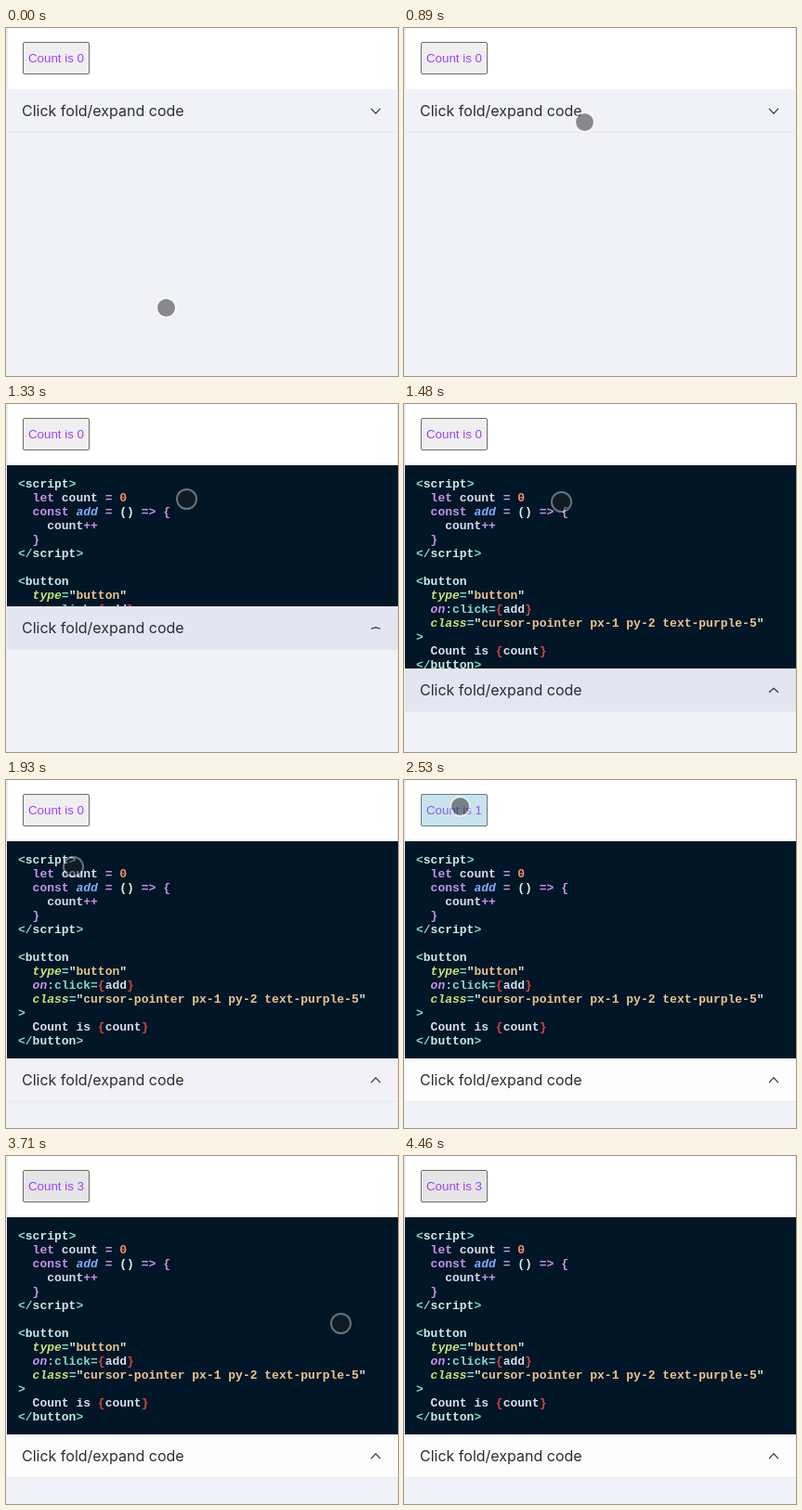
These frames come from a looping animation (422x375 px, 4910 ms). An HTML page:

```html
<!DOCTYPE html>
<html>
<head>
<meta charset="utf-8">
<style>
  html, body { margin: 0; width: 100%; height: 100%; overflow: hidden; background: #f1f2f7; }
  body { position: relative; }
  div, svg { position: absolute; box-sizing: border-box; }
  #top { left: 1px; top: 0; width: 421px; height: 66px; background: #fff; border: solid #e9eaee; border-width: 0 1px; }
  #button {
    left: 18px; top: 15px; width: 72px; height: 35px; border: 1px solid #6b6b6b; border-radius: 2px;
    font: 13.333px/33px "Liberation Sans", Arial, sans-serif; text-align: center; white-space: nowrap; color: #a340f5;
  }
  #tap { left: 18px; top: 15px; width: 72px; height: 35px; border-radius: 2px; background: #33b5e5; }
  #code { left: 1px; top: 66px; width: 421px; overflow: hidden; background: #011627; }
  pre { margin: 13px 12px; font: bold 13px/15px "Liberation Mono", monospace; color: #d6deeb; }
  pre i { color: #c5e478; }
  .t { color: #7fdbca; } .n { color: #caece6; } .k { color: #c792ea; } .f { color: #82aaff; }
  .o { color: #f78c6c; } .s { color: #ecc48d; } .q { color: #d9f5dd; } .b { color: #d3423e; }
  #fold {
    left: 1px; width: 421px; height: 47px; padding-left: 16px; border: 1px solid #e9eaef; border-width: 0 0 1px;
    font: 16px/47px Inter, sans-serif; white-space: nowrap; color: #2c2d32;
  }
  #chevron { left: 391px; top: 18px; width: 12px; height: 11px; }
  #cursor {
    width: 23px; height: 23px; margin: -11.5px; border: 2px solid rgba(255,255,255,.4); border-radius: 50%;
    background: rgba(32,32,32,.5) padding-box;
  }
</style>
</head>
<body>
<div id="top"></div>
<div id="button"></div>
<div id="tap"></div>
<div id="code"><pre></pre></div>
<div id="fold">Click fold/expand code
  <svg id="chevron" viewBox="0 0 12 11"><path id="arrow" fill="none" stroke="#2c2d32" stroke-width="1.2"/></svg>
</div>
<div id="cursor"></div>
<script>
const $ = id => document.getElementById(id);
const LOOP = 4910, TICK = 148.6, CODE_HEIGHT = 234;

// Markup: [class:text] colours a run of code; f and i runs may be italic.
const source = `[t:<][n:script][t:>]
  [k:let] count [k:=] [o:0]
  [k:const] [f i:add] [k:=] [q:()] [k:=>] [k:{]
    count[k:++]
  [k:}]
[t:</][n:script][t:>]

[t:<][n:button]
  [i:type][t:=][q:"][s:button][q:"]
  [k i:on][t::click=][b:{]add[b:}]
  [i:class][t:=][q:"][s:cursor-pointer px-1 py-2 text-purple-5][q:"]
[t:>]
  Count is [b:{]count[b:}]
[t:</][n:button][t:>]`;
const escape = s => s.replace(/</g, '&lt;').replace(/>/g, '&gt;');
document.querySelector('pre').innerHTML = source.replace(/\[([a-z]?)( ?i)?:([^\]]+)\]/g, (_, kind, italic, text) => {
  const tag = italic || kind === 'i' ? 'i' : 'span';
  return `<${tag} class="${kind}">${escape(text)}</${tag}>`;
});

// Pointer path: tick, x, y
const path = [
  [0, 172.5, 301.5], [2, 133, 270], [4, 274, 192], [6, 194.5, 101.5], [9, 194.5, 102.5],
  [11, 145, 108], [13, 72.5, 93], [14, 60, 39], [15, 58, 17], [17, 60.5, 28],
  [22, 60.5, 28], [25, 360.5, 180.5], [27, 405, 245], [29, 239.5, 322.5], [33, 239.5, 322.5]
];

function pointAt(n) {
  const i = path.findIndex(p => p[0] > n);
  const [a, x, y] = path[i - 1], [b, x2, y2] = path[i];
  const u = (n - a) / (b - a);
  return [x + (x2 - x) * u, y + (y2 - y) * u];
}

function draw(now) {
  const n = Math.min(32, Math.floor((now % LOOP + 10) / TICK));

  const u = Math.min(1, Math.max(0, (n - 7.8) / 2.94));
  const open = 1 - (1 - u) ** 2;
  const height = Math.round(CODE_HEIGHT * open);
  $('code').style.height = height + 'px';
  $('fold').style.top = 66 + height + 'px';
  $('fold').style.background = n < 8 ? '#f1f2f7' : n < 11 ? '#e3e5f1' : n < 14 ? '#f1f1f7' : '#fcfcfd';
  const bend = 2.6 * (1 - 2 * open);
  $('arrow').setAttribute('d', `M1 ${5.5 - bend}L6 ${5.5 + bend}L11 ${5.5 - bend}`);

  const count = Math.min(3, Math.max(0, Math.floor((n - 15) / 2)));
  $('button').textContent = 'Count is ' + count;
  $('button').style.background = n < 22 ? '#efefef' : '#e5e5e5';
  $('tap').style.opacity = n < 16 || n > 21 ? 0 : n % 2 ? .2 : .4;

  const [x, y] = pointAt(n), cursor = $('cursor').style;
  cursor.left = x + 'px';
  cursor.top = y + 'px';
  cursor.display = n < 30 ? 'block' : 'none';
}

const start = performance.now();
function loop() {
  draw(performance.now() - start);
  requestAnimationFrame(loop);
}
loop();
</script>
</body>
</html>
```
